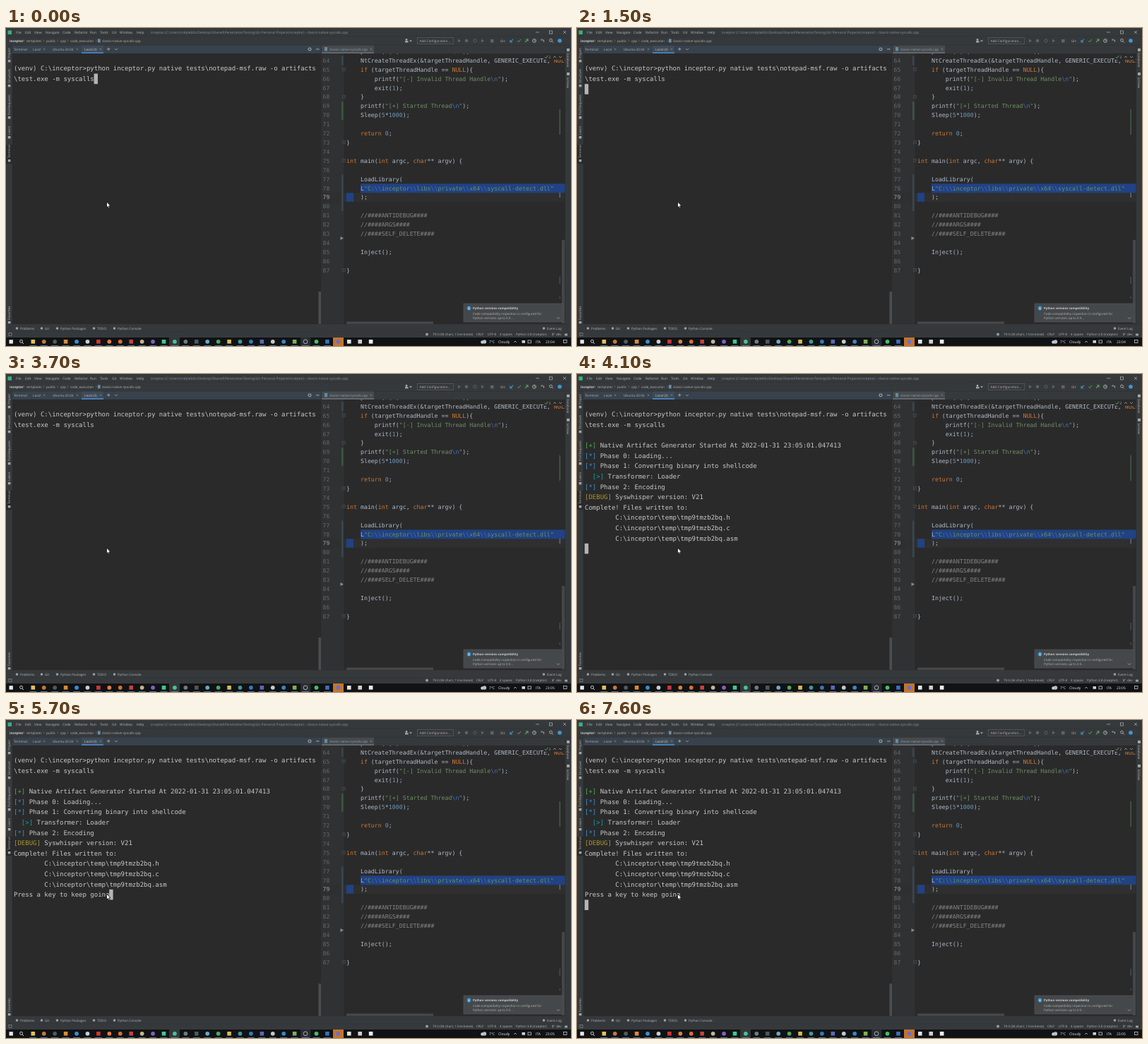
These frames come from a looping animation (800 px wide and 450 px high, 8000 ms). An HTML page with a canvas:

```html
<!DOCTYPE html>
<html lang="en">
<head>
<meta charset="utf-8">
<title>Terminal session</title>
<style>
html, body { margin: 0; width: 100%; height: 100%; overflow: hidden; background: #2a2a2b; }
canvas { display: block; }
</style>
</head>
<body>
<canvas id="stage" width="800" height="450"></canvas>
<script>
const LOOP = 8000;
const MONO = '"DejaVu Sans Mono", monospace';
const SANS = '"Open Sans", "Noto Sans", sans-serif';
const TERM = { x: 11, y: 50, cw: 5.415, lh: 14.6 };
const CODE = { x: 482, y: 39.6, cw: 4.98, lh: 12.91, first: 64 };
const BG = '#2a2a2b', PANEL = '#36393b', EDGE = '#2e3032';
const DIM = '#8f9294', FG = '#b4b4b4';
const SYNTAX = { plain: '#b0bac6', key: '#cc7832', number: '#6897bb', string: '#6f9062',
  escape: '#4573c0', comment: '#858585' };

const view = document.getElementById('stage').getContext('2d');
const backdrop = document.createElement('canvas');
backdrop.width = 800;
backdrop.height = 450;
let g = backdrop.getContext('2d');

function rect(x, y, w, h, color) {
  g.fillStyle = color;
  g.fillRect(x, y, w, h);
}

function box(x, y, w, h, color) {
  g.strokeStyle = color;
  g.lineWidth = 0.7;
  g.strokeRect(x, y, w, h);
}

function dot(x, y, r, color) {
  g.fillStyle = color;
  g.beginPath();
  g.arc(x, y, r, 0, 7);
  g.fill();
}

function ring(x, y, r, color) {
  g.strokeStyle = color;
  g.lineWidth = 0.9;
  g.beginPath();
  g.arc(x, y, r, 0, 7);
  g.stroke();
}

function line(color, width, ...p) {
  g.strokeStyle = color;
  g.lineWidth = width;
  g.beginPath();
  for (let i = 0; i < p.length; i += 2) g.lineTo(p[i], p[i + 1]);
  g.stroke();
}

function poly(color, ...p) {
  g.fillStyle = color;
  g.beginPath();
  for (let i = 0; i < p.length; i += 2) g.lineTo(p[i], p[i + 1]);
  g.fill();
}

// y is the middle of the line
function label(text, x, y, color = FG, size = 4.6, weight = 400) {
  g.font = `${weight} ${size}px ${SANS}`;
  g.textRendering = 'geometricPrecision';
  g.textAlign = 'left';
  g.fillStyle = color;
  g.fillText(text, x, y + size * 0.35);
}

function sideLabel(text, x, y, turn) {
  g.save();
  g.translate(x, y);
  g.rotate(turn * Math.PI / 2);
  label(text, 0, 0);
  g.restore();
}

function cells(text, x, base, cw, size, color) {
  g.font = `${size}px ${MONO}`;
  g.textRendering = 'geometricPrecision';
  g.textAlign = 'left';
  g.fillStyle = color;
  [...text].forEach((c, i) => { if (c !== ' ') g.fillText(c, x + i * cw, base); });
}

function term(text, row, col = 0, color = '#c8c8c8') {
  cells(text, TERM.x + col * TERM.cw, TERM.y + row * TERM.lh + 10.4, TERM.cw, 9, color);
}

function tagged(tag, color, text, row, col = 0) {
  term(tag, row, col, color);
  term(text, row, col + tag.length + 1);
}

const rowY = n => CODE.y + (n - CODE.first) * CODE.lh;

function paint(n, col, text, kind) {
  cells(text, CODE.x + col * CODE.cw, rowY(n) + 9.2, CODE.cw, 8.27, SYNTAX[kind]);
}

const TOKEN = /(?<string>"(?:\\.|[^"])*")|(?<comment>\/\/.*)|(?<key>\b(?:if|int|char|return|NULL)\b)|(?<number>\b\d+\b)|(?<plain>\w+|.)/g;

function code(n, col, text) {
  for (const m of text.matchAll(TOKEN)) {
    const kind = Object.keys(m.groups).find(k => m.groups[k]);
    let at = col + m.index;
    const parts = kind === 'string' ? m[0].split(/(\\.)/) : [m[0]];
    for (const part of parts) {
      paint(n, at, part, part[0] === '\\' ? 'escape' : kind);
      at += part.length;
    }
  }
}

function cross(x, y) {
  line('#85888a', 0.6, x - 1.4, y - 1.4, x + 1.4, y + 1.4);
  line('#85888a', 0.6, x + 1.4, y - 1.4, x - 1.4, y + 1.4);
}

function chevron(x, y, color = FG, dir = 1) {
  line(color, 0.7, x - 2, y - dir, x, y + dir, x + 2, y - dir);
}

function tick(x, y, color) {
  line(color, 1, x - 2.2, y, x - 0.6, y + 1.8, x + 2.4, y - 2);
}

function gear(x, y) {
  ring(x, y, 1.8, '#afb1b3');
  for (let a = 0; a < 6; a++) {
    const c = Math.cos(a * Math.PI / 3), s = Math.sin(a * Math.PI / 3);
    line('#afb1b3', 0.8, x + 2 * c, y + 2 * s, x + 2.8 * c, y + 2.8 * s);
  }
}

function drawTopBars() {
  rect(0, 0, 800, 36, PANEL);
  rect(2.5, 3.5, 5.5, 5.5, '#38b07c');
  const menu = { File: 14, Edit: 27, View: 40, Navigate: 56, Code: 80, Refactor: 97, Run: 119,
    Tools: 133, Git: 150, Window: 161, Help: 185 };
  for (const name in menu) label(name, menu[name], 6, FG, 4.8);
  label('inceptor (C:\\Users\\m4pleb0x\\Desktop\\Shared\\PenetrationTesting\\Git Personal Projects\\inceptor) - classic-native-syscalls.cpp',
    205, 6, DIM, 4.85);
  line(FG, 0.7, 750, 6, 755, 6);
  box(769.5, 4, 4, 4, FG);
  line(FG, 0.7, 789, 4, 793, 8);
  line(FG, 0.7, 793, 4, 789, 8);

  rect(0, 11.5, 800, 0.6, EDGE);
  label('inceptor', 5, 18, '#d0d0d0', 4.7, 700);
  const path = { templates: 29, public: 57, cpp: 77, code_execution: 91, 'classic-native-syscalls.cpp': 136 };
  for (const name in path) {
    label(name, path[name], 18);
    const sx = path[name] - (path[name] > 130 ? 8 : 3.5);
    line('#777', 0.6, sx - 0.8, 16.4, sx + 0.6, 18, sx - 0.8, 19.6);
  }
  rect(130, 15.5, 3.6, 5, '#6f8fa8');

  dot(567, 16.6, 1.4, FG);
  rect(565, 18.4, 4.5, 2, FG);
  poly(FG, 571, 17.5, 575, 17.5, 573, 19.5);
  box(582.5, 13.5, 51, 9, '#5a5d5f');
  label('Add Configuration...', 585.5, 18, FG, 4.7);
  poly('#606365', 640, 15.5, 640, 20.5, 644, 18);
  dot(652, 18, 2.3, '#606365');
  ring(664, 18, 2.2, '#606365');
  poly('#606365', 673, 15.5, 673, 20.5, 677, 18);
  rect(686, 16, 4.5, 4.5, '#606365');
  label('Git:', 700, 18);
  line('#3a96d0', 1.1, 718, 15.8, 714, 20);
  line('#3a96d0', 1.1, 714, 17, 714, 20, 717, 20);
  tick(726.5, 18, '#58a55c');
  line('#58a55c', 1.1, 735, 20, 739, 16);
  line('#58a55c', 1.1, 736, 16, 739, 16, 739, 19);
  ring(748, 18, 2.4, FG);
  line(FG, 0.7, 748, 16.5, 748, 18, 749.4, 18);
  line(FG, 0.8, 761.5, 20, 761.5, 17, 757.5, 17, 759, 15.4);
  ring(771.5, 17.3, 1.9, FG);
  line(FG, 0.9, 773, 18.8, 774.8, 20.6);
  dot(784, 18, 2.8, '#3d9ad6');

  rect(0, 24, 800, 0.7, EDGE);
  rect(9, 24.7, 437, 11.3, '#37424d');
  rect(107, 24.7, 31, 11, '#3d4a57');
  rect(107, 34.3, 31, 1.7, '#4a88c7');
  label('Terminal:', 11, 30);
  label('Local', 38, 30);
  label('Ubuntu-20.04', 66, 30);
  label('Local (3)', 111, 30, '#d0d0d0');
  [54, 101, 134].forEach(x => cross(x, 30));
  line(FG, 0.8, 143, 29.8, 147.4, 29.8);
  line(FG, 0.8, 145.2, 27.6, 145.2, 32);
  chevron(156, 30);
  gear(430, 30);
  line(FG, 0.9, 439, 30, 443.5, 30);

  rect(446, 24.7, 1, 394, EDGE);
  rect(447, 24.7, 74, 11.3, '#464a4d');
  rect(447, 34.4, 74, 1.6, '#6a7076');
  rect(451, 27, 4, 5.5, '#5f8ca8');
  label('classic-native-syscalls.cpp', 458, 30, '#8fa6b8', 4.56);
  cross(517, 30);
}

function drawStripes() {
  rect(0, 25, 9, 394, PANEL);
  rect(0, 165, 9, 27, '#28292b');
  rect(8.6, 25, 0.5, 394, EDGE);
  const names = { Project: 43, Structure: 78, 'Pull Requests': 123, Learn: 151, Terminal: 184, Favorites: 413 };
  for (const name in names) {
    sideLabel(name, 4.6, names[name], -1);
    rect(2.8, names[name] + 2, 3.6, 3.4, '#a2a5a7');
  }
  rect(792, 25, 8, 394, PANEL);
  rect(791.5, 25, 0.6, 394, EDGE);
  rect(794, 29, 4, 4, '#a2a5a7');
  sideLabel('Database', 796, 35, 1);
  rect(794, 63, 4, 4, '#a2a5a7');
  sideLabel('SciView', 796, 69.5, 1);
}

function drawEditor() {
  g.save();
  g.beginPath();
  g.rect(447, 36, 344.5, 383);
  g.clip();
  rect(447, 36, 345, 383, BG);
  rect(447, 36, 31.5, 383, '#2f3132');
  rect(447, rowY(79), 345, CODE.lh, '#2f2f30');
  rect(502, rowY(78), 290, CODE.lh, '#214283');
  rect(482, rowY(79), 10, CODE.lh - 0.5, '#214283');

  for (let n = 64; n <= 87; n++)
    cells(String(n), 448.5, rowY(n) + 9.2, CODE.cw, 8, n === 79 ? '#a4a3a3' : '#65696c');

  rect(475, rowY(64), 2.6, CODE.lh, '#374752');
  rect(475, rowY(69), 2.6, CODE.lh * 2, '#3c573c');
  rect(475, rowY(77), 2.6, CODE.lh * 4, '#374752');
  for (const n of [65, 68, 73, 75, 87]) {
    const y = rowY(n) + 6;
    box(476.6, y - 2, 4, 4, '#4c4f51');
    line('#4c4f51', 0.6, 477.6, y, 479.6, y);
  }
  poly('#8a8c8e', 473.5, 295, 473.5, 300, 478, 297.5);

  code(63, 4, 'printf("[*] Created Thread\\n");');
  code(64, 4, 'NtCreateThreadEx(&targetThreadHandle, GENERIC_EXECUTE, NULL,');
  code(65, 4, 'if (targetThreadHandle == NULL){');
  code(66, 8, 'printf("[-] Invalid Thread Handle\\n");');
  code(67, 8, 'exit(1);');
  code(68, 4, '}');
  code(69, 4, 'printf("[+] Started Thread\\n");');
  code(70, 4, 'Sleep(5*1000);');
  code(72, 4, 'return 0;');
  code(73, 0, '}');
  code(75, 0, 'int main(int argc, char** argv) {');
  code(77, 4, 'LoadLibrary(');
  code(78, 4, 'L"C:\\\\inceptor\\\\libs\\\\private\\\\x64\\\\syscall-detect.dll"');
  code(79, 4, ');');
  code(81, 4, '//####ANTIDEBUG####');
  code(82, 4, '//####ARGS####');
  code(83, 4, '//####SELF_DELETE####');
  code(85, 4, 'Inject();');
  code(87, 0, '}');

  rect(761, 36.5, 30, 8.5, BG);
  tick(765, 41, '#58a55c');
  label('2', 768.5, 41, FG, 4.8);
  chevron(777, 41, FG, -1);
  chevron(785, 41);
  rect(787, 300, 4.5, 118, '#444647');
  rect(783.6, 115, 1.2, 36, '#4a6b4a');
  rect(783.6, 233, 1.2, 7, '#6a7a86');
  rect(783.6, 352, 1.2, 10, '#41586a');
  rect(783.6, 380, 1.2, 3, '#41586a');
  rect(482, 415.5, 123, 3.5, '#47494a');
  g.restore();
}

function drawNotice() {
  rect(648, 390, 141, 26, '#45484a');
  box(648, 390, 141, 26, '#525557');
  dot(655.5, 396.5, 2.9, '#3a8fd0');
  rect(655.1, 396, 0.9, 2.3, '#fff');
  rect(655.1, 394.6, 0.9, 0.8, '#fff');
  label('Python versions compatibility', 661, 396.5, '#d0d0d0', 4.3, 700);
  label('Code compatibility inspection is configured for', 661, 404, FG, 4.5);
  label('Python versions up to 3.9...', 661, 410.2, FG, 4.5);
  chevron(782, 410.5);
}

function drawStatus() {
  rect(0, 419, 800, 19, PANEL);
  rect(0, 418.7, 800, 0.6, EDGE);
  rect(0, 429.7, 800, 0.5, EDGE);
  const tools = { Problems: 20, Git: 55, 'Python Packages': 77, TODO: 129, 'Python Console': 158, 'Event Log': 766 };
  for (const name in tools) {
    label(name, tools[name], 425);
    dot(tools[name] - 4.5, 425, 1.8, '#9ea1a3');
  }
  box(4, 431.5, 4, 4, '#8a8d8f');
  dot(596, 433.5, 2, '#9a9da0');
  const info = { '79:3 (58 chars, 1 line break)': 604, CRLF: 666, 'UTF-8': 682, '4 spaces': 699,
    'Python 3.8 (inceptor)': 722, dev: 779 };
  for (const name in info) label(name, info[name], 433.5, FG, 4.5);
  line(FG, 0.7, 774, 431.5, 774, 435.5);
  line(FG, 0.7, 774, 434, 776.5, 432);
  rect(791, 432.5, 4, 3, '#9a9da0');
}

function drawTaskbar() {
  rect(0, 438, 800, 12, '#101214');
  rect(231, 438, 15, 12, '#34373a');
  rect(463, 438, 15, 12, '#c4742c');
  rect(417, 438, 14.5, 12, '#2a2d30');
  rect(4.5, 441.2, 5.4, 5.4, '#e8e8e8');
  ring(21.5, 443.3, 2, '#e0e0e0');
  line('#e0e0e0', 0.9, 23, 445, 25, 447);
  const tints = ('#e8bf57 #c9763c #55595c #e08a2e #3d8ed0 #c9d0d4 #d63434 #e5803a #e06f2c ' +
    '#c9423a #c8b48c #8a5cc0 #3fc98a #45c592 #767a7c #50565a #6fa7c8 #4fa860 #d6bd50 #3e9a98 ' +
    '#3978b8 #5b68b8 #c8c8c8 #3c86c8 #80b050 #b8bcc0 #46c060 #3a70c0 #5f70d8 #e4e4e4 #d8cccc #eeeeee').split(' ');
  tints.forEach((tint, i) => {
    const x = 38.3 + i * 15.43;
    if (i === 25) ring(x, 443.8, 2.9, tint);
    else if (i % 3 === 0 || i > 28) rect(x - 2.8, 441, 5.6, 5.6, tint);
    else dot(x, 443.8, 2.9, tint);
    if (i < 28) rect(x - 5, 449.2, 10, 0.8, '#5b8fb5');
  });
  dot(674.5, 444.5, 2.3, '#c8d0d8');
  dot(677.5, 444, 2.7, '#b4c2d0');
  label('7°C', 684, 444, '#eee', 5.1);
  label('Cloudy', 697, 444, '#eee', 5.1);
  chevron(721, 444, '#ddd', -1);
  rect(730.5, 442, 4.5, 3.8, '#d0d0d0');
  box(739, 442, 4.5, 3.8, '#ddd');
  label('ITA', 750, 444, '#eee', 5);
  box(789.5, 441.5, 4.5, 4, '#ddd');
}

function drawPointer(x, y) {
  g.beginPath();
  for (const [dx, dy] of [[0, 0], [0, 8], [1.8, 6.4], [3, 9], [4.3, 8.4], [3.1, 5.9], [5.5, 5.7]])
    g.lineTo(x + dx, y + dy);
  g.closePath();
  g.lineWidth = 0.8;
  g.strokeStyle = '#111';
  g.fillStyle = '#fff';
  g.fill();
  g.stroke();
}

function drawOutput() {
  tagged('[+]', '#4fae4a', 'Native Artifact Generator Started At 2022-01-31 23:05:01.047413', 3);
  tagged('[*]', '#3993d4', 'Phase 0: Loading...', 4);
  tagged('[*]', '#3993d4', 'Phase 1: Converting binary into shellcode', 5);
  tagged('[>]', '#12a3a3', 'Transformer: Loader', 6, 2);
  tagged('[*]', '#3993d4', 'Phase 2: Encoding', 7);
  tagged('[DEBUG]', '#a8942c', 'Syswhisper version: V21', 8);
  term('Complete! Files written to:', 9);
  ['h', 'c', 'asm'].forEach((ext, i) => term('C:\\inceptor\\temp\\tmp9tmzb2bq.' + ext, 10 + i, 8));
}

// Cursor states: start time, row, column; no row means hidden
const CURSOR = [[0, 1, 21], [1000], [1500, 2, 0], [2000, 3, 0], [2500], [3000, 3, 0], [3500],
  [4100, 13, 0], [5200], [5700, 13, 25], [6600, 14, 0], [7100], [7600, 14, 0]];

function drawCursor(t) {
  const [, row, col] = CURSOR.filter(c => c[0] <= t).pop();
  if (row) rect(TERM.x + col * TERM.cw - 0.2, TERM.y + row * TERM.lh, TERM.cw, TERM.lh, '#b4b4b4');
}

function drawBackdrop() {
  rect(0, 0, 800, 450, BG);
  drawTopBars();
  drawStripes();
  rect(442.5, 373, 3.5, 46, '#4c4e4f');
  drawEditor();
  drawNotice();
  drawStatus();
  drawTaskbar();
  term('(venv) C:\\inceptor>python inceptor.py native tests\\notepad-msf.raw -o artifacts', 0);
  term('\\test.exe -m syscalls', 1);
}

drawBackdrop();
g = view;

function frame() {
  const t = performance.now() % LOOP;
  g.drawImage(backdrop, 0, 0);
  label(t < 3700 ? '23:04' : '23:05', 764, 444, '#eee', 5);
  if (t >= 4100) drawOutput();
  if (t >= 5700) term('Press a key to keep going', 13);
  drawCursor(t);
  drawPointer(142.5, 246);
  requestAnimationFrame(frame);
}
frame();
</script>
</body>
</html>
```
